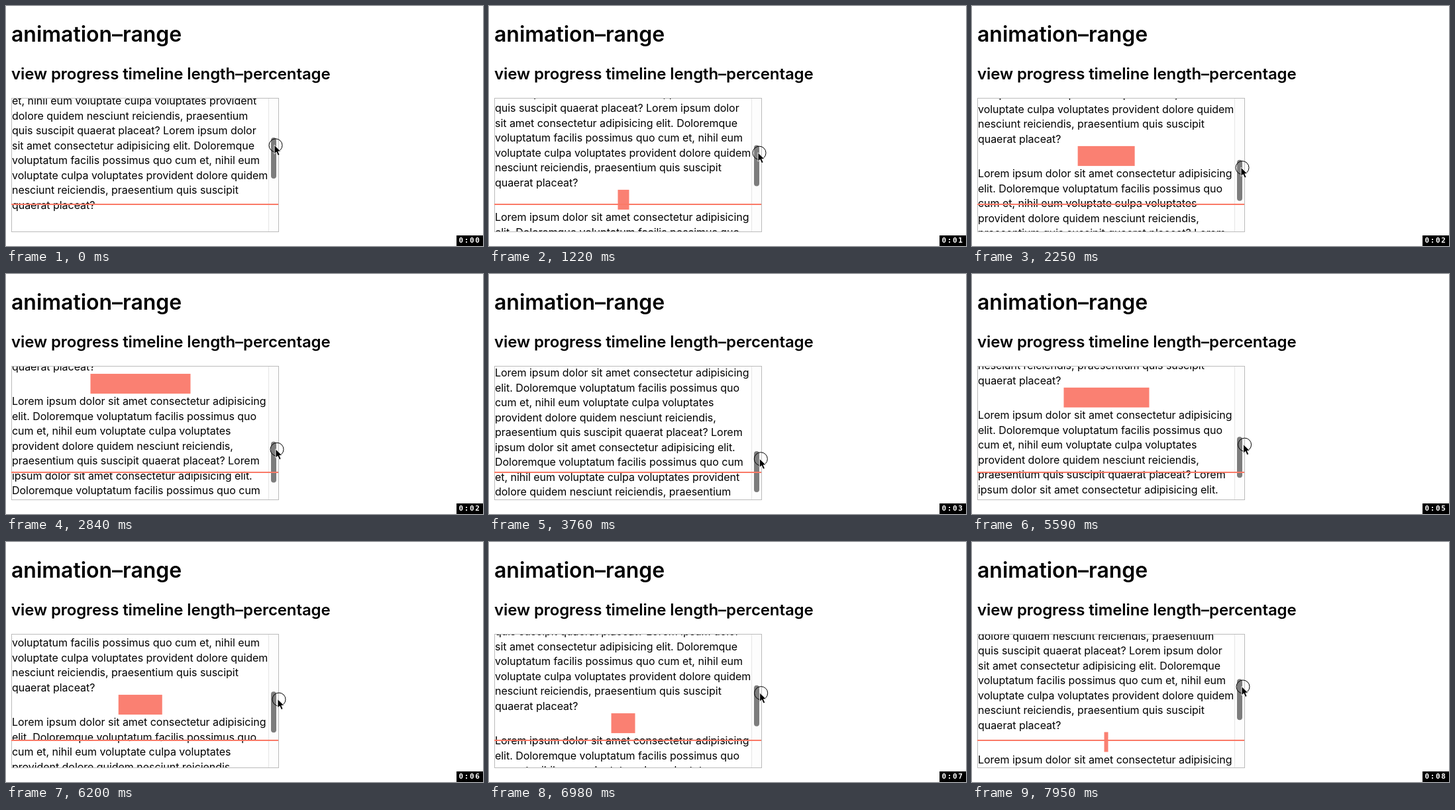
An HTML page that plays this animation: 720x363 px, repeating every 8000 ms.

```html
<!DOCTYPE html>
<html lang="en">
<head>
<meta charset="utf-8">
<title>animation-range</title>
<style>
/* --y: top of the bar on the stage; --x: pointer. All else follows from them. */
@property --y { syntax: "<number>"; inherits: true; initial-value: 311.5; }
@property --x { syntax: "<number>"; inherits: true; initial-value: 406; }

html, body { margin: 0; width: 100%; height: 100%; overflow: hidden; background: #fff; }
.stage {
  --thumb: calc(199 + (311.5 - var(--y)) * .339);
  position: relative; width: 720px; height: 363px; overflow: hidden;
  color: #000; font-family: Inter, "Liberation Sans", sans-serif; font-optical-sizing: none;
  animation: scroll 8s linear infinite, drift 8s linear infinite;
}
.stage * { position: absolute; margin: 0; }
h1, h2 { left: 8px; font-weight: 600; white-space: nowrap; }
h1 { top: 23px; font-size: 32px; line-height: 40px; letter-spacing: -.02px; }
h2 { top: 88px; font-size: 24px; line-height: 30px; letter-spacing: -.1px; }

.box {
  left: 8px; top: 139px; width: 402px; height: 201px;
  border: 1px solid #bbb; overflow: hidden;
}
.content {
  left: 0; top: -140px; width: 387px; height: 0;
  transform: translateY(calc(var(--y) * 1px));
}
p { left: 0; font-size: 16px; line-height: 22.5px; letter-spacing: -.04px; white-space: pre; }
.above { bottom: 0; }
.below { top: 30px; }
.bar {
  left: 193.5px; top: 0; height: 30px; background: #fa8072;
  width: max(0px, calc((278 - var(--y)) * 1.055px + 17px));
  transform: translateX(-50%);
}
.track { left: 387px; top: 0; width: 14px; height: 100%; background: #fdfdfd; border-left: 1px solid #e6e6e6; }
.thumb {
  left: 400px; top: 0; width: 8px; height: 61.5px; border-radius: 4px; background: #7d7d7d;
  transform: translateY(calc(var(--thumb) * 1px));
}
.line { left: 8px; top: 299px; width: 403px; height: 2px; background: #fa7a67; }
.pointer {
  left: .5px; top: 0; width: 40px; height: 40px; overflow: visible;
  transform: translate(calc(var(--x) * 1px), calc((var(--thumb) + 11.8) * 1px));
}
.clock { left: 680px; top: 347px; width: 40px; height: 16px; background: #000; overflow: hidden; }
.clock pre {
  left: 3.5px; top: 0; color: #fff;
  font: bold 11px/16px "DejaVu Sans Mono", monospace; letter-spacing: 1.6px;
  animation: tick 8s infinite;
}

@keyframes scroll {
  0%, .75% { --y: 311.5; }
  9.875%, 11.375% { --y: 287; }
  12.375%, 14.25% { --y: 282.5; }
  15.25% { --y: 278; }
  24.25% { --y: 232; }
  28.125% { --y: 212; }
  34.5% { --y: 157; }
  35.5% { --y: 151; }
  40% { --y: 127; }
  44.5% { --y: 112; }
  53.125%, 58% { --y: 99; }
  59.375% { --y: 108; }
  67.375%, 68.5% { --y: 161; }
  77.5% { --y: 231; }
  78.5% { --y: 236; }
  88.75%, 89.375% { --y: 263; }
  99.375%, 100% { --y: 287.5; }
}
@keyframes drift {
  0%, .75% { --x: 406; }
  15.25%, 28.125% { --x: 407; }
  35.5% { --x: 408; }
  53.125%, 59.375% { --x: 410; }
  77.5% { --x: 411; }
  99.375%, 100% { --x: 408; }
}
@keyframes tick {
  0% { transform: none; animation-timing-function: steps(1, end); }
  11.625% { transform: translateY(-16px); animation-timing-function: steps(7, end); }
  99.125%, 100% { transform: translateY(-128px); }
}
</style>
</head>
<body>
<div class="stage">
  <h1>animation–range</h1>
  <h2>view progress timeline length–percentage</h2>
  <div class="box">
    <div class="content">
      <p class="above">et, nihil eum voluptate culpa voluptates provident
dolore quidem nesciunt reiciendis, praesentium
quis suscipit quaerat placeat? Lorem ipsum dolor
sit amet consectetur adipisicing elit. Doloremque
voluptatum facilis possimus quo cum et, nihil eum
voluptate culpa voluptates provident dolore quidem
nesciunt reiciendis, praesentium quis suscipit
quaerat placeat?</p>
      <div class="bar"></div>
      <p class="below">Lorem ipsum dolor sit amet consectetur adipisicing
elit. Doloremque voluptatum facilis possimus quo
cum et, nihil eum voluptate culpa voluptates
provident dolore quidem nesciunt reiciendis,
praesentium quis suscipit quaerat placeat? Lorem
ipsum dolor sit amet consectetur adipisicing elit.
Doloremque voluptatum facilis possimus quo cum
et, nihil eum voluptate culpa voluptates provident
dolore quidem nesciunt reiciendis, praesentium
quis suscipit quaerat placeat? Lorem ipsum dolor</p>
    </div>
    <div class="track"></div>
  </div>
  <div class="thumb"></div>
  <div class="line"></div>
  <svg class="pointer">
    <circle r="10" fill="none" stroke="#000"/>
    <path d="M-2-.5V13L1.2 10.1 3.5 15.5 6.1 14.4 3.8 9.2H7.9Z" stroke="#fff" stroke-width=".9"/>
  </svg>
  <div class="clock"><pre>0:00
0:01
0:02
0:03
0:04
0:05
0:06
0:07
0:08</pre></div>
</div>
</body>
</html>
```
